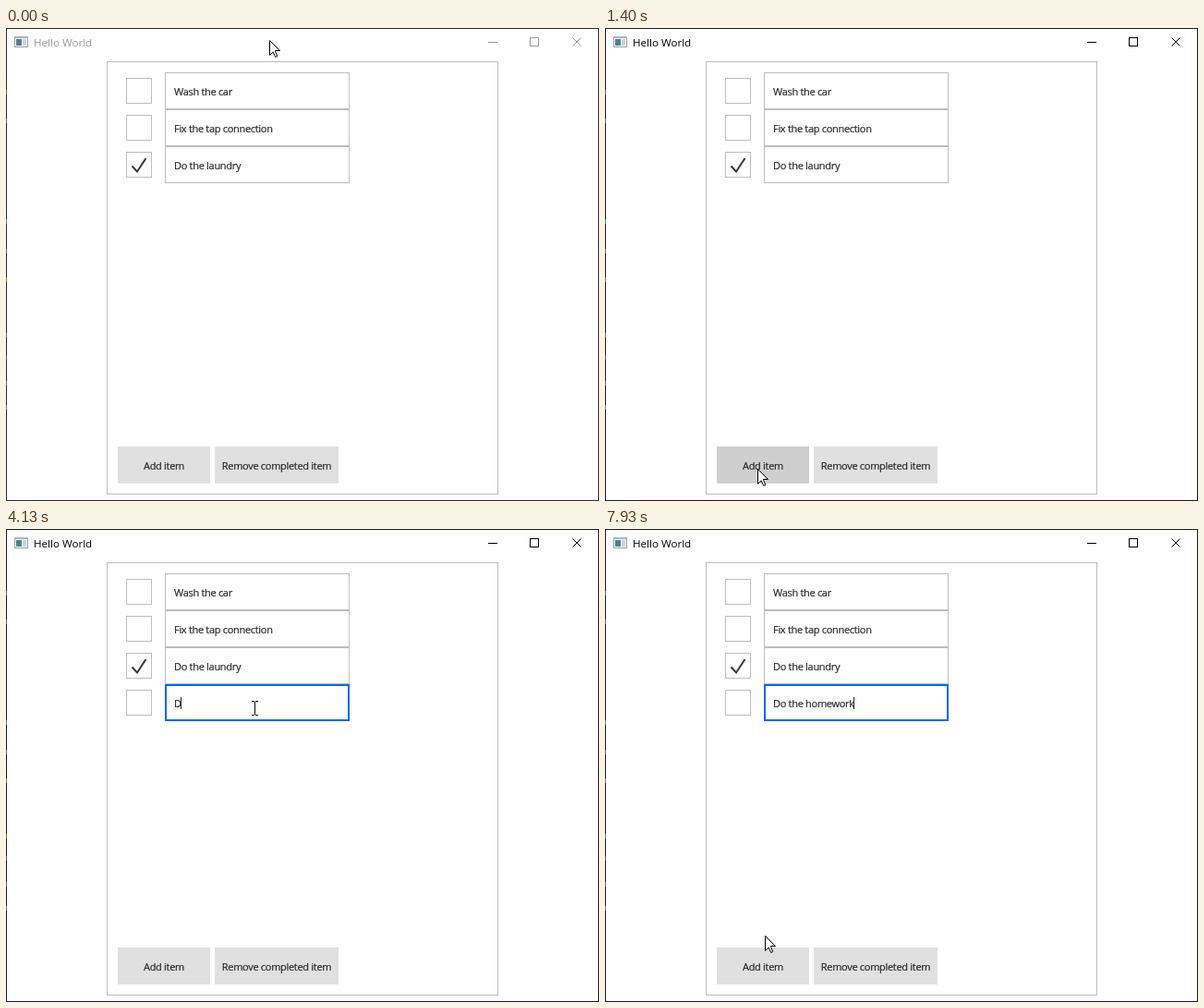
Recreate the animation shown at these times as an HTML page. Size 642 px wide and 512 px high, loop 8 s.

```html
<!DOCTYPE html>
<html lang="en">
<head>
<meta charset="utf-8">
<title>To-do list</title>
<style>
  html, body { margin: 0; width: 100%; height: 100%; overflow: hidden; background: #fff; }
  svg { display: block; width: 642px; height: 512px; }
  text { font: 11px "Open Sans", "Noto Sans", sans-serif; letter-spacing: -.3px; white-space: pre;
         fill: #26282a; stroke: #26282a; stroke-width: .2px; }
  #bar text { font-size: 11.6px; letter-spacing: 0; fill: currentColor; stroke: none; }
  .middle { text-anchor: middle; }
  .box { fill: #fff; stroke: #bdbdbd; }
  .button { fill: #e0e0e0; }
  .box, .button, #caret, #beam, .crisp { shape-rendering: crispEdges; }
  #bar { color: #999; }
  #bar.active { color: #000; }
  #controls { fill: none; stroke: currentColor; }
</style>
</head>
<body>
<svg viewBox="0 0 642 512">
  <rect width="642" height="512" fill="#fff"/>
  <rect class="crisp" id="edge" x=".5" y=".5" width="641" height="511" fill="none" stroke="#2b2b2b"/>
  <g id="specks" class="crisp"></g>

  <g id="bar">
    <g class="crisp">
      <rect x="9.5" y="9.5" width="14" height="11" fill="#f4f6f7" stroke="#98a3aa"/>
      <rect x="9" y="9" width="15" height="2" fill="#a9b5bd"/>
      <rect x="11" y="12" width="6" height="7" fill="#4b8585"/>
      <rect x="18" y="12" width="4" height="7" fill="#cbd5da"/>
    </g>
    <text x="30" y="20">Hello World</text>
    <g id="controls">
      <path d="M522 15.5h10M567.5 10.5h9v9h-9z" class="crisp"/>
      <path d="M613.5 10.5l9 9m0-9l-9 9"/>
    </g>
  </g>

  <rect class="box" x="109.5" y="36.5" width="423" height="468"/>
  <g id="rows"></g>
  <g id="newRow">
    <rect class="box" x="130.5" y="174.5" width="27" height="27"/>
    <rect class="box" x="172.5" y="168.5" width="199" height="39"/>
    <rect id="focus" class="crisp" x="173" y="169" width="198" height="38" fill="none" stroke="#0066ff" stroke-width="2"/>
    <text id="typed" x="182" y="193"></text>
    <rect id="caret" y="182" width="1" height="13" fill="#26282a"/>
  </g>

  <rect id="add" class="button" x="121" y="453" width="100" height="40"/>
  <rect class="button" x="226" y="453" width="134" height="40"/>
  <text class="middle" x="171" y="478">Add item</text>
  <text class="middle" x="293" y="478">Remove completed item</text>

  <path id="arrow" d="M.5 .5V16.5L4.2 13L6.7 18.5L8.8 17.6L6.5 12.2V11.5H11.5Z" fill="#fff" stroke="#000"/>
  <path id="beam" d="M-3 -7.5h3m1 0h3M.5 -7v14M-3 7.5h3m1 0h3" fill="none" stroke="#000"/>
</svg>

<script>
const LOOP = 8000, TICK = 200 / 3;
const $ = id => document.getElementById(id);

const TASKS = ["Wash the car", "Fix the tap connection", "Do the laundry"];

// [time, x, y] of the pointer's hot spot
const POINTER = [
  [0, 285, 13], [270, 262, 80], [600, 214, 198], [870, 183, 310], [1070, 170, 425], [1200, 165, 477],
  [1600, 165, 477], [1670, 190, 452], [1800, 261, 355], [2000, 285, 275], [2200, 278, 212],
  [2330, 271, 195], [2400, 271, 195], [2470, 269, 195], [2600, 269, 195], [2670, 269, 194],
  [7600, 269, 194], [7670, 266, 203], [7800, 222, 310], [7930, 173, 440], [8000, 173, 440]
];

// [time, text in the new field]
const TYPING = [
  [0, ""], [4130, "D"], [4270, "Do"], [4330, "Do "], [4470, "Do t"], [4530, "Do th"],
  [4670, "Do the"], [4730, "Do the "], [4930, "Do the h"], [5070, "Do the ho"], [5200, "Do the hoe"],
  [5930, "Do the ho"], [6130, "Do the hom"], [6200, "Do the home"], [6400, "Do the homew"],
  [6470, "Do the homewo"], [6600, "Do the homewor"], [6670, "Do the homework"]
];

const CARET_OFF = [[0, 2870], [3400, 3670], [5730, 5930], [7200, 7730]];

const SPECKS = [[69, "#a0522d"], [100, "#666"], [209, "#3c9a4a"], [241, "#a04848"], [272, "#b5602c"],
  [332, "#a0622d"], [356, "#555"], [384, "#666"], [410, "#777"]];

$("rows").innerHTML = TASKS.map((task, i) => `<g transform="translate(0 ${40 * i})">
  <rect class="box" x="130.5" y="54.5" width="27" height="27"/>
  <rect class="box" x="172.5" y="48.5" width="199" height="39"/>
  <text x="182" y="73">${task}</text></g>`).join("") +
  '<path d="M136.5 149.5L142 155.5L151.5 141" fill="none" stroke="#353637" stroke-width="2"/>';

$("specks").innerHTML = SPECKS.map(([y, color]) =>
  `<rect y="${y - 2}" width="1" height="5" fill="${color}"/>`).join("");

const show = (id, on) => $(id).setAttribute("visibility", on ? "visible" : "hidden");

function pointerAt(t) {
  const i = POINTER.findIndex(key => key[0] > t);
  const [t0, x0, y0] = POINTER[i - 1], [t1, x1, y1] = POINTER[i];
  const k = (t - t0) / (t1 - t0);
  return [Math.round(x0 + (x1 - x0) * k), Math.round(y0 + (y1 - y0) * k)];
}

function render(t) {
  const active = t >= 1400, focused = t >= 2870;
  $("bar").setAttribute("class", active ? "active" : "");
  $("edge").setAttribute("stroke", active ? "#1b1b1b" : "#2b2b2b");
  $("add").style.fill = active && t < 1470 ? "#cfcfcf" : "";
  $("newRow").style.display = t >= 1470 ? "" : "none";
  show("focus", focused);

  const typed = $("typed");
  typed.textContent = TYPING.findLast(key => key[0] <= t)[1];
  const width = t >= 4130 ? typed.getComputedTextLength() : 0;
  $("caret").setAttribute("x", Math.floor(182 + width));
  show("caret", !CARET_OFF.some(([from, to]) => t >= from && t < to));

  // The pointer is refreshed fifteen times a second, on times rounded to 10 ms
  const tick = Math.round(Math.floor((t + 4) / TICK) * TICK / 10) * 10;
  const [x, y] = pointerAt(Math.min(tick, LOOP - 1));
  const overField = t >= 1470 && y >= 168 && y < 208;
  show("beam", overField);
  show("arrow", !overField);
  for (const id of ["arrow", "beam"]) $(id).setAttribute("transform", `translate(${x} ${y})`);
}

const start = performance.now();
function frame() {
  render((performance.now() - start) % LOOP);
  requestAnimationFrame(frame);
}
frame();
</script>
</body>
</html>
```
